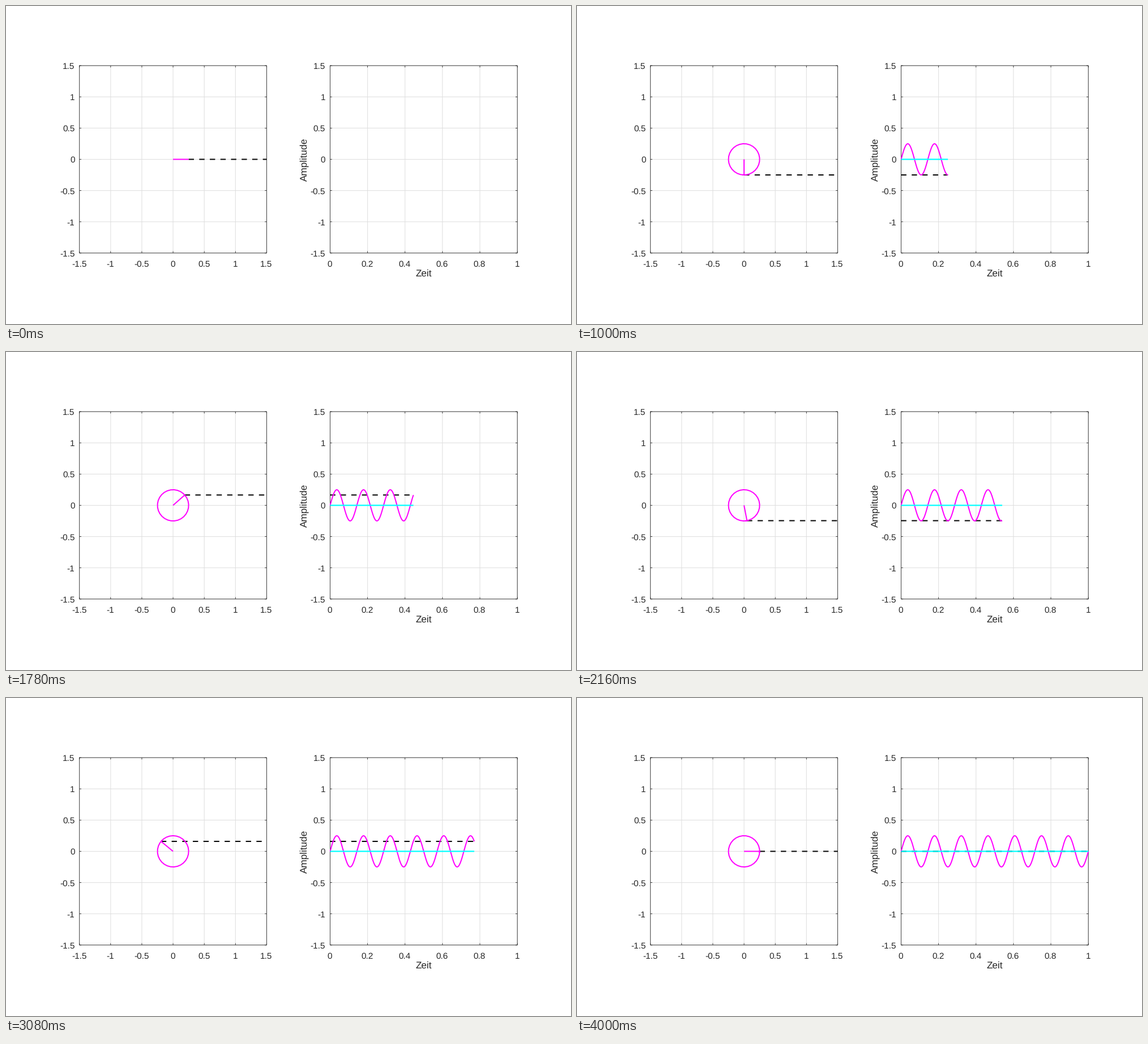
Recreate the animation shown at these times as a matplotlib script. Size 998 by 561 pixels, loop 4.02 s.

```python
import numpy as np
import matplotlib.pyplot as plt
from matplotlib.animation import FuncAnimation

W, H, DPI = 998, 561, 64
PT = 72 / DPI  # points per pixel
FRAMES, STEP_MS = 201, 20
AMP, FREQ = 0.25, 7
INK, GRID = "#262626", "#dedede"
ZERO_Y, UNIT = 270.5, 110.2
TOP, BOTTOM = ZERO_Y - 1.5 * UNIT, ZERO_Y + 1.5 * UNIT
TICK = 3.3

plt.rcParams.update({"font.family": "Liberation Sans", "text.hinting": "none"})
fig = plt.figure(figsize=(W / DPI, H / DPI), dpi=DPI, facecolor="white")
ax = fig.add_axes([0, 0, 1, 1])
ax.set(xlim=(0, W), ylim=(H, 0))
ax.axis("off")


def line(x=(), y=(), color=INK, width=0.85, z=2, **kw):
    kw.setdefault("solid_capstyle", "butt")
    return ax.plot(x, y, color=color, lw=width * PT, zorder=z, snap=False, **kw)[0]


def label(x, y, text, size=15.4, **kw):
    ax.text(x, y, text, fontsize=size * PT, color=INK, va="baseline", **kw)


def y_px(v):
    return ZERO_Y - UNIT * v


def panel(left, right, x_ticks):
    for x, v in zip(np.linspace(left, right, len(x_ticks)), x_ticks):
        line([x, x], [TOP, BOTTOM], GRID, 1, z=1)
        line([x, x], [BOTTOM, BOTTOM - TICK])
        line([x, x], [TOP, TOP + TICK])
        label(x - 0.5, 459.5, f"{v:g}", ha="center")
    for v in np.linspace(-1.5, 1.5, 7):
        y = y_px(v)
        line([left, right], [y, y], GRID, 1, z=1)
        line([left, left + TICK], [y, y])
        line([right, right - TICK], [y, y])
        label(left - 8.3, y + 5.8, f"{v:g}", ha="right")
    line([left, right, right, left, left], [TOP, TOP, BOTTOM, BOTTOM, TOP],
         solid_capstyle="projecting", solid_joinstyle="miter")


L0, L1 = 129.74, 460.4
R0, R1 = 572.5, 903.2
CX = (L0 + L1) / 2
panel(L0, L1, np.linspace(-1.5, 1.5, 7))
panel(R0, R1, np.round(np.linspace(0, 1, 6), 1))
label(737.5, 477, "Zeit", 17.1, ha="center")
label(531, ZERO_Y, "Amplitude", 17.1, ha="center", rotation=90,
      rotation_mode="anchor")

dash = dict(color="black", width=2, z=3, dashes=(4.68, 4.68),
            dash_capstyle="butt")
level_l, level_r = line(**dash), line(**dash)
circle, arm, wave = (line(color="magenta", width=2, z=4) for _ in range(3))
mean = line(color="cyan", width=2.2, z=5)
artists = [level_l, level_r, circle, arm, wave, mean]

t = np.arange(FRAMES) / (FRAMES - 1)
phase = 2 * np.pi * FREQ * t
tip_x = CX + UNIT * AMP * np.cos(phase)
tip_y = y_px(AMP * np.sin(phase))
time_x = R0 + (R1 - R0) * t
TURN = int(np.ceil((FRAMES - 1) / FREQ))  # steps in one revolution


def update(i):
    x, y, now = tip_x[i], tip_y[i], time_x[i]
    past = slice(0, i + 1)
    turn = slice(max(0, i - TURN), i + 1)
    arm.set_data([CX, x], [ZERO_Y, y])
    circle.set_data(tip_x[turn], tip_y[turn])
    level_l.set_data([x, L1], [y, y])
    level_r.set_data([R0, now], [y, y])
    wave.set_data(time_x[past], tip_y[past])
    mean.set_data([R0, now], [ZERO_Y, ZERO_Y])
    for a in artists:
        a.set_visible(i > 0 or a in (arm, level_l))
    return artists


anim = FuncAnimation(fig, update, frames=FRAMES, interval=STEP_MS,
                     repeat=True, repeat_delay=0, blit=True)
plt.show()
```
